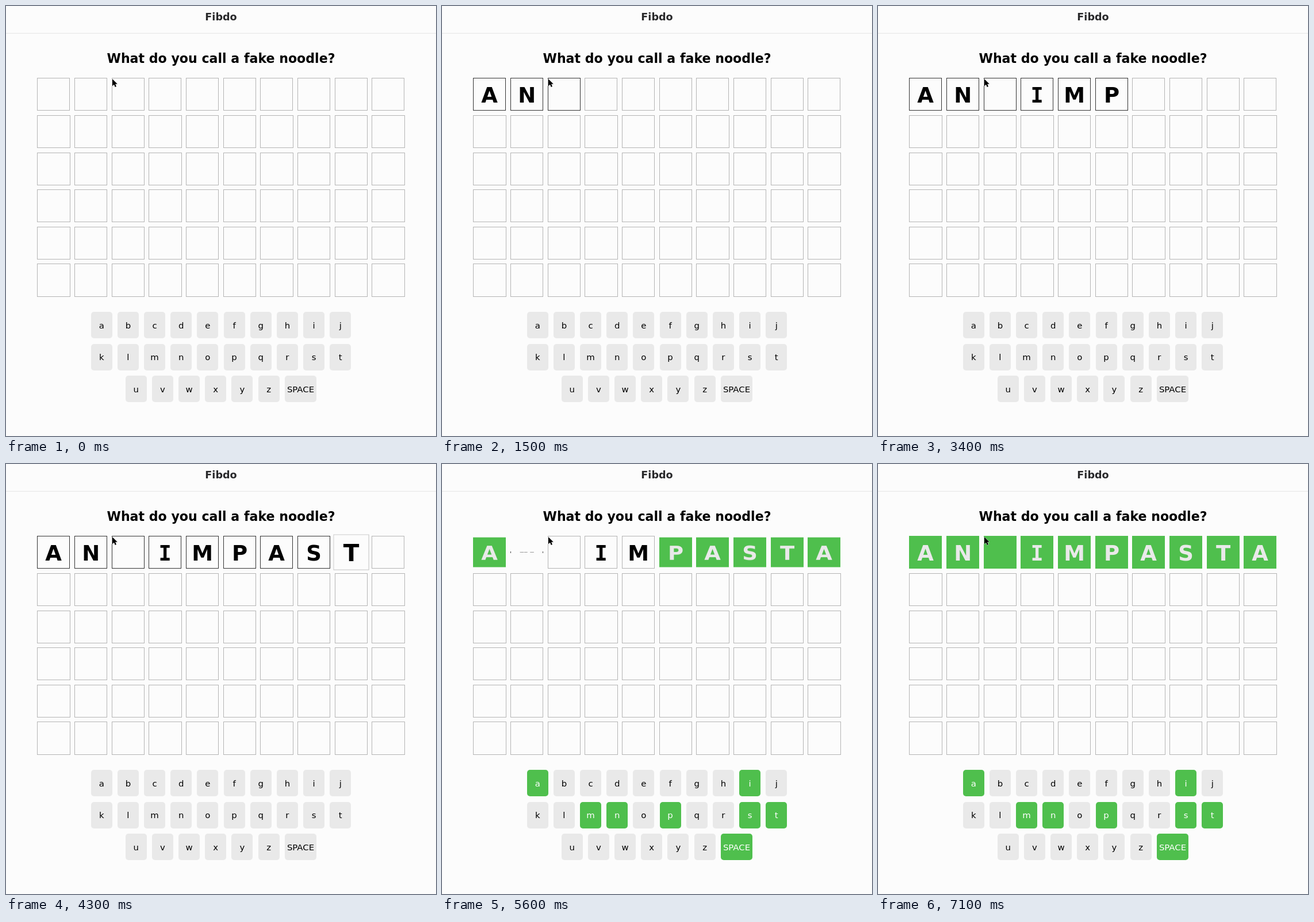
An HTML page that plays this animation: 748x748 px, repeating every 7200 ms.

```html
<!DOCTYPE html>
<html lang="en">
<head>
<meta charset="utf-8">
<title>Word riddle</title>
<style>
  html, body { margin: 0; width: 100%; height: 100%; overflow: hidden; background: #fcfcfc; }
  #stage { position: relative; width: 748px; height: 748px; overflow: hidden; font-family: "DejaVu Sans", Verdana, sans-serif; }

  .box {
    position: absolute; box-sizing: border-box; padding-top: .1em;
    display: flex; align-items: center; justify-content: center;
    line-height: 1; white-space: nowrap;
  }
  .bar { left: 0; width: 748px; font-weight: bold; }
  #name { top: 0; height: 37px; font-size: 17.6px; color: #29292b; }
  #riddle { top: 70px; height: 39.4px; font-size: 22.1px; color: #000; }
  #rule { position: absolute; top: 47px; width: 748px; height: 1px; background: #e6e6e6; }

  .cell {
    width: 57.3px; height: 57.3px; border: 1px solid #b4b4b4;
    font-size: 37px; font-weight: bold; color: transparent;
  }
  .serif { font-family: "DejaVu Sans Mono", monospace; }
  .typed {
    animation: pop 200ms var(--typed) forwards paused,
               relax 1ms 5228ms forwards paused,
               flip 500ms var(--flip) forwards paused;
  }

  .key { width: 36.9px; height: 46.1px; border-radius: 5px; background: #e9e9e9; font-size: 14.9px; color: #000; }
  .hit { animation: mark 300ms 5278ms forwards paused; }

  #cursor { position: absolute; left: 184px; top: 126px; }

  @keyframes pop {
    0% { color: #000; border-color: #c6c6c6; transform: none; }
    50% { color: #000; border-color: #c6c6c6; transform: scale(1.16); }
    100% { color: #000; border-color: #333; transform: scale(1); }
  }
  @keyframes relax { from, to { border-color: #b4b4b4; } }
  @keyframes flip {
    0% { color: #000; background: #fcfcfc; border-color: #444; transform: rotateX(0); }
    45% { color: #9d9d9d; background: #fcfcfc; border-color: #444; transform: rotateX(90deg); }
    55% { color: #e9e9e9; background: #4fbf4d; border-color: #4fbf4d; transform: rotateX(90deg); }
    100% { color: #e9e9e9; background: #4fbf4d; border-color: #4fbf4d; transform: rotateX(0); }
  }
  @keyframes mark { to { color: #fff; background: #4fbf4d; } }
</style>
</head>
<body>
<div id="stage">
  <div id="name" class="box bar">Fibdo</div>
  <div id="rule"></div>
  <div id="riddle" class="box bar">What do you call a fake noodle?</div>
</div>
<script>
  const LOOP = 7200, STEP = 100, FLIP = 5228;
  const answer = 'AN IMPASTA';
  const typedAt = [85, 785, 1285, 1985, 2384, 2985, 3440, 3785, 4266, 4580];
  const stage = document.getElementById('stage');

  function addBox(cls, x, y, text = '') {
    const el = document.createElement('div');
    el.className = 'box ' + cls;
    el.style.left = x + 'px';
    el.style.top = y + 'px';
    el.textContent = text;
    stage.append(el);
    return el;
  }

  // Letter grid; only the first five tiles flip one after another.
  for (let row = 0; row < 6; row++) {
    for (let col = 0; col < 10; col++) {
      const cell = addBox('cell', 54.4 + 64.65 * col, 125.2 + 64.65 * row);
      if (row) continue;
      cell.textContent = answer[col].trim();
      cell.classList.add('typed');
      cell.classList.toggle('serif', answer[col] === 'I');
      cell.style.setProperty('--typed', typedAt[col] + 'ms');
      cell.style.setProperty('--flip', FLIP + (col < 5 ? 200 * col : 0) + 'ms');
    }
  }

  // Keyboard
  const addKey = (label, x, row, hit) =>
    addBox(hit ? 'key hit' : 'key', x, 532.4 + 55.4 * row, label);

  ['abcdefghij', 'klmnopqrst', 'uvwxyz'].forEach((letters, row) => {
    const left = row < 2 ? 147.8 : 207.8;
    [...letters].forEach((c, i) =>
      addKey(c, left + 46.17 * i, row, answer.includes(c.toUpperCase())));
  });
  addKey('SPACE', 484.8, 2, true).style.width = '55.4px';

  stage.insertAdjacentHTML('beforeend',
    `<svg id="cursor" width="14" height="20">
       <path d="M1 1V13.2L3.9 10.5L5.8 14.9L8 14L6.1 9.7H9.8Z" fill="#000" stroke="#fff" paint-order="stroke"/>
     </svg>`);

  const anims = document.getAnimations();
  function draw() {
    const t = Math.floor(performance.now() % LOOP / STEP) * STEP;
    for (const a of anims) a.currentTime = t;
    requestAnimationFrame(draw);
  }
  draw();
</script>
</body>
</html>
```
